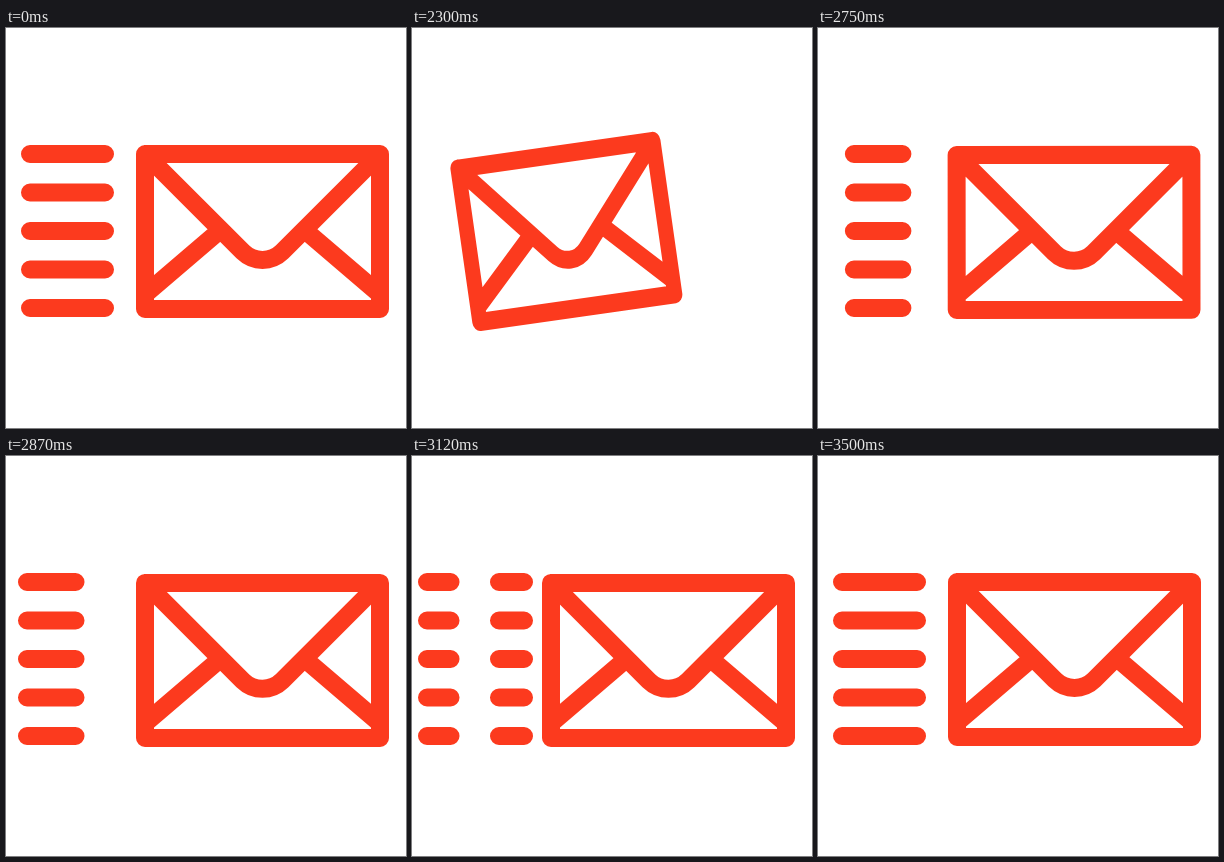
Recreate the animation shown at these times as an HTML page. Size 400 px wide and 400 px high, loop 3.52 s.

```html
<!DOCTYPE html>
<html lang="en">
<head>
<meta charset="utf-8">
<title>Sending mail</title>
<style>
html, body { margin: 0; height: 100%; overflow: hidden; background: #fff; }
svg { display: block; width: 100%; height: 100%; }
path { fill: none; stroke: #fc3a1e; stroke-width: 18; stroke-linecap: round; stroke-linejoin: round; }
</style>
</head>
<body>
<svg viewBox="0 0 400 400">
  <path id="lines"/>
  <path id="envelope" d="M-117.5-77.5h235v155h-235z
    L-19.6 20.4A28 28 0 0 0 19.6 20.4L117.5-77.5
    M-117.5 63L-48.5 4M117.5 63L48.5 4"/>
</svg>
<script>
const LOOP = 3520, START = 2020, PEAK = 2220, EMIT = 2542, END = 3500;
const TRACK_LEFT = 15, TRACK_RIGHT = 112, TRACK = TRACK_RIGHT - TRACK_LEFT;
const ROWS = [126, 164.5, 203, 241.5, 280];
const lines = document.getElementById('lines');
const envelope = document.getElementById('envelope');

// How far the envelope is pulled back: 0 at rest, 1 at the far left.
function pullback(t) {
  if (t < PEAK) return 1 - 0.6 * (1 - (t - START) / (PEAK - START)) ** 2;
  const p = Math.min(1, (t - PEAK) / 610);
  return (1 - p ** (4 / 3)) ** 3;
}

const row = (from, to) =>
  to >= from ? ROWS.map(y => `M${from} ${y}H${to + 0.01}`).join('') : '';

// A dash on a track that wraps around at both ends.
function dash(from, to) {
  return [0, TRACK].map(shift => row(
    Math.max(TRACK_LEFT, from + shift),
    Math.min(TRACK_RIGHT, to + shift))).join('');
}

function place(x, y, angle, scale) {
  envelope.setAttribute('transform',
    `translate(${x} ${y}) rotate(${angle}) scale(${scale} 1)`);
}

function draw(t) {
  if (t < START || t >= END) {
    place(256.5, 203.5, 0, 1);
    lines.setAttribute('d', row(24, 99));
    return;
  }
  const e = pullback(t);
  const x = 256.5 - e * (92 + 42 * e);
  const scale = 1 - 0.2 * e;
  place(x, 204.4 - 1.2 * e, -10 * e, scale);

  let d = '';
  if (t < PEAK) {
    d = row(24, x - 126.5 * scale - 29.5);
  } else if (t >= EMIT) {
    const from = Math.max(85 - 0.245 * (t - 2550), 36 - 0.124 * (t - 2750));
    d = dash(from, 87 - 0.124 * Math.max(0, t - 2730));
  }
  lines.setAttribute('d', d);
}

const began = performance.now();
function tick() {
  draw((performance.now() - began) % LOOP);
  requestAnimationFrame(tick);
}
tick();
</script>
</body>
</html>
```
